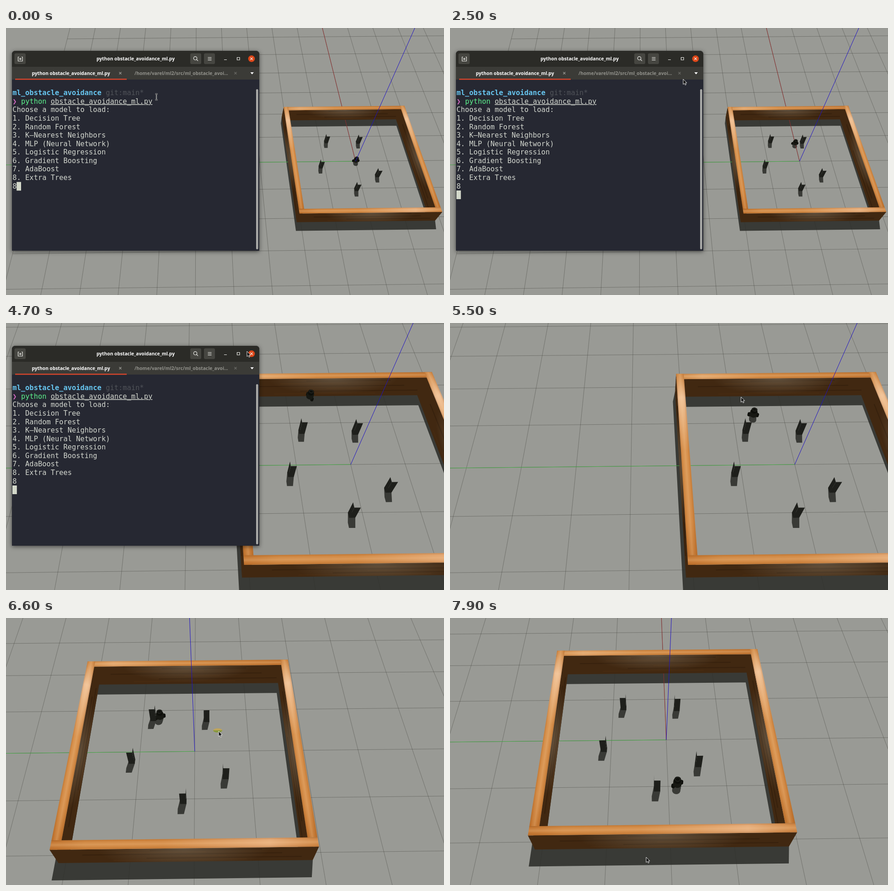
These frames come from a looping animation (958 px wide and 585 px high, 8 s). An HTML page with a canvas:

```html
<!DOCTYPE html>
<html lang="en">
<head>
<meta charset="utf-8">
<title>Obstacle avoidance</title>
<style>
  html, body { margin: 0; width: 100%; height: 100%; overflow: hidden; background: #999a95; }
  canvas, svg { position: absolute; left: 0; top: 0; width: 958px; height: 585px; }
  #window { filter: drop-shadow(0 2px 5px rgba(0, 0, 0, .55)); }
  .ui { font: bold 10.25px "Open Sans", sans-serif; fill: #fff; }
  .dim { fill: #92928c; }
  .mono { font: 15.4px "DejaVu Sans Mono", monospace; fill: #d3d7cf; white-space: pre; }
  .dir { font-weight: bold; fill: #67c5ef; }
  .git { fill: #505359; }
  .mark { fill: #d369c2; }
  .cmd { fill: #5cf28c; }
  .arg { text-decoration: underline; }
  .icon { fill: none; stroke: #eeeeea; stroke-width: 1.2; }
</style>
</head>
<body>
<canvas id="scene" width="958" height="585"></canvas>
<svg viewBox="0 0 958 585">
  <g id="window">
    <path d="M13 488V58q0-8 8-8H546q8 0 8 8V488Z" fill="#262832"/>
    <path d="M13 85V58q0-8 8-8H546q8 0 8 8V85Z" fill="#2b2b27"/>
    <path d="M13 85H554V113H13Z" fill="#3b3b37"/>
    <path d="M20 111H264V113.5H20Z" fill="#d5452b"/>
    <g fill="#464641">
      <rect x="18.500" y="55.500" width="24.500" height="23.500" rx="3"/>
      <rect x="403" y="55.500" width="24" height="23.500" rx="3"/>
      <rect x="433" y="55.500" width="24" height="23.500" rx="3"/>
    </g>
    <g class="icon">
      <path d="M28.500 63.500H26.500V72.500H36V63.500H34M31.200 65V70.500M28.500 67.800H34"/>
      <circle cx="414" cy="66.300" r="3.700"/>
      <path d="M416.800 69L420 72.200M441.500 64.500H449.500M441.500 67.500H449.500M441.500 70.500H449.500M477 69.500H483M505.500 64.500H511V70H505.500Z"/>
    </g>
    <circle cx="537" cy="67.300" r="7.300" fill="#dd4618"/>
    <path class="icon" d="M534.300 64.600L539.700 70M539.700 64.600L534.300 70"/>
    <path class="icon" d="M247.500 96.500L252.500 101.500M252.500 96.500L247.500 101.500" style="stroke:#9a9a94"/>
    <path class="icon" d="M499.500 96.500L504.500 101.500M504.500 96.500L499.500 101.500" style="stroke:#6c6c67"/>
    <path d="M534.500 97H542L538.200 101.500Z" fill="#fff"/>
    <text class="ui" x="198" y="71">python obstacle_avoidance_ml.py</text>
    <text class="ui" x="56.500" y="102.500">python obstacle_avoidance_ml.py</text>
    <text class="ui dim" x="281" y="102.500">/home/varel/ml2/src/ml_obstacle_avoi...</text>
    <rect x="547" y="134" width="4.500" height="351" rx="2.200" fill="#a9aaa8"/>
    <rect id="block" width="9.800" height="19" fill="#d3d8ca"/>
    <g id="lines"></g>
  </g>
  <g id="beam" fill="none">
    <path d="M-2.500 -6.500H2.500M0 -6.500V6.500M-2.500 6.500H2.500" stroke="#eee" stroke-width="2.200"/>
    <path d="M-2.500 -6.500H2.500M0 -6.500V6.500M-2.500 6.500H2.500" stroke="#111" stroke-width=".9"/>
  </g>
  <path id="arrow" d="M0 0V11.500L2.700 9.200L4.600 13L6.500 12.100L4.700 8.400L8 8.200Z" fill="#111" stroke="#fff" stroke-width=".9"/>
</svg>
<script>
const $ = id => document.getElementById(id);
const ctx = $('scene').getContext('2d');
const LOOP = 8000, STEP = 100;

// ---- terminal text ----
const rows = [
  '<tspan class="dir">ml_obstacle_avoidance</tspan> <tspan class="git">git:main*</tspan>',
  '<tspan class="mark">❯</tspan><tspan x="32.900" class="cmd">python</tspan> <tspan class="arg">obstacle_avoidance_ml.py</tspan>',
  'Choose a model to load:',
  ...['Decision Tree', 'Random Forest', 'K–Nearest Neighbors', 'MLP (Neural Network)',
    'Logistic Regression', 'Gradient Boosting', 'AdaBoost', 'Extra Trees'].map((name, i) => `${i + 1}. ${name}`),
  '8'
];
$('lines').innerHTML = rows.map((row, i) =>
  `<text class="mono" x="14.300" y="${147.3 + i * 18.57}">${row}</text>`).join('');

// ---- timelines: [time, ...values] ----
const view = [ // screen position and depth of the world origin
  [3500, 764.5, 292, 14.4], [3800, 762, 297, 12.1], [4400, 754, 310, 8.43], [5700, 754, 310, 8.43],
  [5900, 713.5, 305.7, 8.43], [6500, 412.8, 292.3, 8.43], [6600, 412.8, 292.3, 8.43], [7300, 473, 267, 8.43]
].map(([t, x, y, w]) => [t, (x - 441) * w, (y - 292.5) * w, w]);
const drive = [ // x, y, heading
  [1800, 0, 0, 0], [2500, .69, .02, 0], [3300, 1.38, .28, .6], [3800, 1.66, .54, .7], [4700, 1.676, .516, 2],
  [5000, 1.65, .52, 3], [5900, .823, .661, 3], [6600, .814, .672, 3.5], [7900, -.973, -.157, 3.6]
];
const pointer = [
  [1900, 329, 151], [2400, 500, 118], [2500, 510, 112], [3400, 777, 267], [4400, 777, 267], [4700, 527, 62],
  [5000, 480, 60], [5300, 480, 60], [5700, 793, 264], [5900, 793, 264], [6500, 465, 248], [6600, 465, 248],
  [7300, 526, 222], [7900, 429, 524]
];

function track(keys, t) {
  const i = keys.findIndex(k => k[0] > t);
  if (i === 0) return keys[0].slice(1);
  if (i < 0) return keys[keys.length - 1].slice(1);
  const a = keys[i - 1], b = keys[i], f = (t - a[0]) / (b[0] - a[0]);
  return a.slice(1).map((v, j) => v + (b[j + 1] - v) * f);
}

// ---- camera: fixed rotation, moving position ----
const F = 1006, TILT = Math.atan(1.382), C = Math.cos(TILT), S = Math.sin(TILT);
const YAW = -.0127, CY = Math.cos(YAW), SY = Math.sin(YAW);
let cam;
function project(x, y, z = 0) {
  const h = x * CY + y * SY, r = x * SY - y * CY;
  const w = cam[2] + C * h - S * z;
  return [441 + (cam[0] + F * r) / w, 292.5 + (cam[1] - F * (S * h + C * z)) / w];
}

function trace(pts) {
  pts.forEach((p, i) => i ? ctx.lineTo(...p) : ctx.moveTo(...p));
  ctx.closePath();
}
function fill(pts, style) {
  ctx.beginPath();
  trace(pts);
  ctx.fillStyle = style;
  ctx.fill();
}
function line(a, b, style, width = 1) {
  ctx.beginPath();
  ctx.moveTo(...a);
  ctx.lineTo(...b);
  ctx.strokeStyle = style;
  ctx.lineWidth = width;
  ctx.stroke();
}
const mix = (a, b, f) => [a[0] + (b[0] - a[0]) * f, a[1] + (b[1] - a[1]) * f];
const facing = q => q.reduce((sum, p, i) => {
  const n = q[(i + 1) % q.length];
  return sum + p[0] * n[1] - n[0] * p[1];
}, 0) > 0;

// ---- world ----
const X0 = -2.125, X1 = 1.868, Y0 = -1.855, Y1 = 2.115, T = .15, WALL = .5, POST = .345;
const SUN = [-.556, .111], SHADE = '#393a36';
const posts = [[.78, .8], [.745, -.225], [-.21, 1.13], [-.56, -.545], [-1.048, .19]]
  .map(([x, y]) => [x - .05, x + .05, y - .053, y + .053]);
const bright = ['#d08a48', '#efc197', '#d68f4b', '#d18843', '#c27632'];
const walls = {
  far: [[X1 - T, X1, Y0, Y1], ['#cd8846', '#e0a46a', '#d08843', '#c77d39', '#c07533']],
  left: [[X0 + T, X1 - T, Y1 - T, Y1], bright],
  right: [[X0 + T, X1 - T, Y0, Y0 + T], bright],
  front: [[X0, X0 + T, Y0, Y1], ['#c27632', '#cf8742', '#d18843', '#e5ac7a', '#cf8745']]
};

function shadow([x0, x1, y0, y1], h) {
  const a = SUN[0] * h, b = SUN[1] * h;
  trace([[x1, y0], [x1, y1], [x1 + a, y1 + b], [x0 + a, y1 + b], [x0 + a, y0 + b], [x0, y0]]
    .map(p => project(...p)));
}

// visible sides, each as top right, bottom right, bottom left, top left
function sides([x0, x1, y0, y1], h) {
  return [[x0, y0, x0, y1], [x0, y1, x1, y1], [x1, y0, x0, y0]].map(([ax, ay, bx, by]) =>
    [project(ax, ay, h), project(ax, ay), project(bx, by), project(bx, by, h)]).filter(facing);
}

function darkWood(q) {
  const [tr, br, bl, tl] = q;
  const mid = mix(tl, tr, .5), len = Math.hypot(tr[0] - tl[0], tr[1] - tl[1]);
  fill(q, '#412811');
  if (len < 60) return;
  for (let i = 1; i < 7; i++) {
    const f = i / 7, a = mix(tl, bl, f), b = mix(tr, br, f);
    line(mix(a, b, (i * .37) % .5), mix(a, b, .5 + (i * .29) % .5), i % 2 ? 'rgba(25,12,2,.25)' : 'rgba(100,60,22,.16)', 2);
  }
  ctx.save();
  ctx.beginPath();
  trace(q);
  ctx.clip();
  ctx.translate(...mid);
  ctx.rotate(Math.atan2(tr[1] - tl[1], tr[0] - tl[0]));
  ctx.scale(1, .25);
  const r = len * .32, sheen = ctx.createRadialGradient(0, 0, 0, 0, 0, r);
  sheen.addColorStop(0, 'rgba(145,138,122,.42)');
  sheen.addColorStop(1, 'rgba(145,138,122,0)');
  ctx.fillStyle = sheen;
  ctx.fillRect(-r, -r, 2 * r, 2 * r);
  ctx.restore();
}

function wallSides([box]) {
  sides(box, WALL).forEach(darkWood);
}

// side rails reach over the far wall's ends
function wallTop([[x0, x1, y0, y1], tones]) {
  const across = y1 - y0 < x1 - x0, end = across ? X1 : x1;
  const nr = project(x0, y0, WALL), nl = project(x0, y1, WALL);
  const fl = project(end, y1, WALL), fr = project(end, y0, WALL);
  // a, b: one long edge; c, d: the other
  const [a, b, c, d] = across ? [fl, nl, fr, nr] : [fl, fr, nl, nr];
  const g = ctx.createLinearGradient(...mix(a, c, .5), ...mix(b, d, .5));
  [0, .13, .42, .82, 1].forEach((s, i) => g.addColorStop(s, tones[i]));
  fill([a, b, d, c], g);
  const band = (f0, f1, style) => fill([mix(a, c, f0), mix(b, d, f0), mix(b, d, f1), mix(a, c, f1)], style);
  band(.25, .7, 'rgba(255,215,165,.1)');
  band(.4, .58, 'rgba(255,215,165,.1)');
  band(0, .12, 'rgba(140,70,15,.16)');
  band(.85, 1, 'rgba(140,70,15,.16)');
}

function ring(x, y, r, z) {
  return Array.from({ length: 18 }, (_, i) => project(x + r * Math.cos(i * Math.PI / 9), y + r * Math.sin(i * Math.PI / 9), z));
}
function drum(x, y, r, z0, z1, style) {
  for (let i = 0; i <= 5; i++) fill(ring(x, y, r, z0 + (z1 - z0) * i / 5), style);
}
function robot([x, y, a]) {
  const sx = -Math.sin(a) * .08, sy = Math.cos(a) * .08;
  drum(x + sx, y + sy, .03, 0, .06, '#10110d');
  drum(x - sx, y - sy, .03, 0, .06, '#10110d');
  drum(x, y, .07, .02, .12, '#181914');
  drum(x, y, .055, .12, .18, '#0f100c');
  ctx.beginPath();
  trace(ring(x, y, .04, .18));
  ctx.strokeStyle = '#33342f';
  ctx.lineWidth = 1;
  ctx.stroke();
}

function ground(t, bot) {
  ctx.fillStyle = '#999a95';
  ctx.fillRect(0, 0, 958, 585);
  ctx.beginPath();
  Object.values(walls).forEach(w => shadow(w[0], WALL));
  posts.forEach(p => shadow(p, POST));
  ctx.fillStyle = SHADE;
  ctx.fill();
  for (let i = 0; i < 6; i++) {
    const z = i * .04;
    fill(ring(bot[0] + SUN[0] * z, bot[1] + SUN[1] * z, .07, 0), SHADE);
  }
  for (let i = -10; i <= 10; i++) {
    line(project(i, -10), project(i, 10), 'rgba(45,45,40,.36)');
    line(project(-10, i), project(10, i), 'rgba(45,45,40,.36)');
  }
  line(project(0, 0), project(0, 25), '#45a945');
  if (t < 3600 || t >= 7200) line(project(0, 0), project(25, 0), '#8c3030');
}

function scene(t) {
  cam = track(view, t);
  const bot = track(drive, t);
  ground(t, bot);
  wallSides(walls.far);
  wallTop(walls.far);
  wallSides(walls.left);
  wallSides(walls.right);
  wallTop(walls.left);
  wallTop(walls.right);
  const items = posts.map(p => [p[0] + .05, () => sides(p, POST).forEach(q => fill(q, '#1e1f1b'))]);
  items.push([bot[0], () => robot(bot)]);
  items.sort((a, b) => b[0] - a[0]).forEach(item => item[1]());
  wallSides(walls.front);
  wallTop(walls.front);
  if (t >= 5800 && t < 7300) {
    const [x, y] = project(.487, -.434);
    ctx.beginPath();
    ctx.ellipse(x, y, 10, 4.5, 0, 0, Math.PI * 2);
    ctx.fillStyle = '#bfa55a';
    ctx.fill();
    ctx.beginPath();
    ctx.ellipse(x, y, 10, 4.5, 0, 0, Math.PI);
    ctx.fillStyle = '#84973f';
    ctx.fill();
  }
  line(project(0, 0), project(0, 0, 8), '#1f12c4');
}

function show(id, on, x, y) {
  const el = $(id);
  el.setAttribute('visibility', on ? 'visible' : 'hidden');
  if (x !== undefined) el.setAttribute('transform', `translate(${x} ${y})`);
}

function frame() {
  const t = Math.floor(performance.now() % LOOP / STEP) * STEP;
  scene(t);
  const open = t < 5400, entered = t >= 1200;
  $('window').style.display = open ? '' : 'none';
  const lit = entered ? Math.floor((t - 1200) / 570) % 2 === 0 : t < 300 || t >= 1000;
  show('block', lit, entered ? 14 : 23.2, entered ? 356 : 337.3);
  const [x, y] = track(pointer, t);
  show('beam', t < 1200 || t >= 1900 && t < 2500, x, y);
  show('arrow', t >= 2500, x, y);
  requestAnimationFrame(frame);
}
frame();
</script>
</body>
</html>
```
